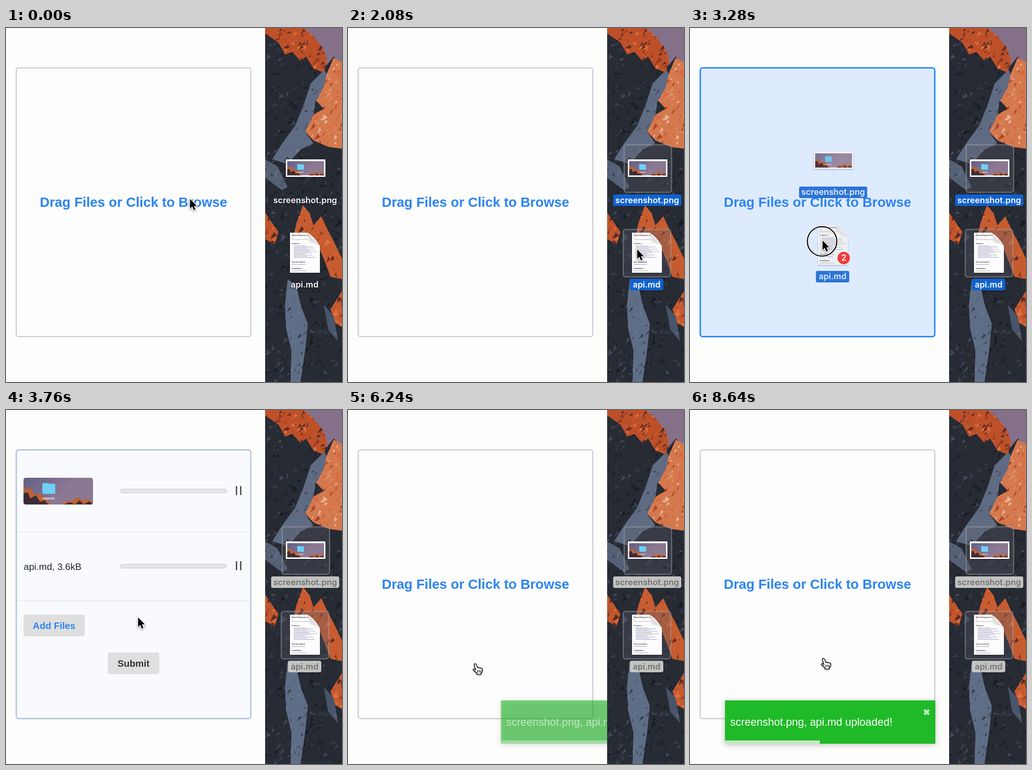
An HTML page with a canvas for the animation above (8720 ms loop, 730 by 768 pixels).

```html
<!DOCTYPE html>
<html lang="en">
<head>
<meta charset="utf-8">
<title>File drop upload</title>
<style>
html, body { margin: 0; width: 100%; height: 100%; overflow: hidden; background: #fdfdfc; }
canvas { display: block; }
</style>
</head>
<body>
<canvas id="stage" width="730" height="768"></canvas>
<script>
const LOOP = 8720, STEP = 80, EDGE = 563;
const SANS = '"Liberation Sans", Arial, sans-serif', UI = 'Inter, "Open Sans", sans-serif';
const BLUE = '#2c84f2';

// Moments at which the state changes, in ms
const BAND = 640, BAND_END = 1440, GRAB = 2200, DRAG = 2415, ENTER = 2700, DROP = 3340;
const SENDING = 3900, SUBMIT = 5700, SENT = 5900, TOAST = 5990;

// Pointer stops: time, x, y
const stops = [
  [80, 400, 371], [600, 584, 233], [680, 584, 233], [1280, 753, 704], [1440, 753, 704],
  [2120, 627, 478], [DRAG, 627, 478], [3255, 288, 461], [3760, 287, 450], [4700, 287, 450],
  [5200, 284, 499], [5600, 277, 550], [6880, 276, 551], [8000, 276, 551], [8640, 290, 539]
];

const canvas = document.getElementById('stage');
let g = canvas.getContext('2d');

const clamp = v => Math.max(0, Math.min(1, v));
const ramp = (t, a, b) => clamp((t - a) / (b - a));
const smooth = u => u * u * (3 - 2 * u);
const mix = (a, b, u) => a + (b - a) * u;
const rgb = (a, b, u) => `rgb(${a.map((v, i) => Math.round(mix(v, b[i], u)))})`;

function box(x, y, w, h, r, fill, stroke, lw = 1) {
  g.beginPath();
  g.roundRect(x, y, w, h, r);
  if (fill) { g.fillStyle = fill; g.fill(); }
  if (stroke) { g.strokeStyle = stroke; g.lineWidth = lw; g.stroke(); }
}

function text(str, x, y, font, color, align = 'left') {
  g.font = font;
  g.fillStyle = color;
  g.textAlign = align;
  g.fillText(str, x, y);
}

function line(d, color, lw) {
  g.strokeStyle = color;
  g.lineWidth = lw;
  g.stroke(new Path2D(d));
}

function shape(d, color) {
  g.fillStyle = color;
  g.fill(new Path2D(d));
}

function shadow(color, blur, y = 0) {
  g.shadowColor = color;
  g.shadowBlur = blur;
  g.shadowOffsetY = y;
}

const noShadow = () => shadow('transparent', 0);

// Wallpaper: flat rock and snow areas with scattered slivers
let seed = 11;
const rnd = () => (seed = (seed * 16807) % 2147483647) / 2147483647;

function rock(d, color, tints, n, [x, y, w, h]) {
  const area = new Path2D(d);
  g.save();
  g.clip(area);
  g.fillStyle = color;
  g.fill(area);
  for (let i = 0; i < n; i++) {
    const px = x + rnd() * w, py = y + rnd() * h, s = 3 + rnd() * 9;
    g.fillStyle = tints[i % tints.length];
    g.beginPath();
    g.moveTo(px, py);
    g.lineTo(px + s * (rnd() - .2), py + s * .6);
    g.lineTo(px - s * rnd(), py + s * (.6 + rnd()));
    g.fill();
  }
  g.restore();
}

function paintWall() {
  const dark = ['#191c25', '#343945', '#20232c', '#414a5b', '#2b2a30'];
  const snow = ['#59667d', '#6c7990', '#4c576c', '#343c4b'];
  const lit = ['#e2703f', '#8e3a22', '#c9582f', '#592c25'];
  const pale = ['#e8b294', '#d9663a', '#a9482b', '#e08a60'];
  rock('M563 0H730V768H563Z', '#272b34', dark, 900, [563, 0, 167, 768]);
  rock('M640 0H730V80L712 62 696 82 680 40Z', '#857089', ['#857089'], 1, [640, 0, 1, 1]);
  rock('M692 90L699 105 688 135 672 160 668 190 650 225 668 250 640 264 612 295 578 285 600 250 628 212 646 168 662 120Z',
    '#5f6b82', snow, 90, [575, 90, 125, 205]);
  rock('M563 285L590 300 612 345 600 352 563 325Z', '#566176', snow, 30, [563, 285, 50, 67]);
  rock('M563 0H648L668 18 690 45 698 72 690 96 668 88 652 62 640 72 622 52 606 58 592 32 563 12Z',
    '#bd5029', lit, 150, [563, 0, 135, 96]);
  rock('M712 64L730 74V262L700 258 668 244 650 225 668 188 690 175 674 158 690 128 697 98Z',
    '#d4784e', pale, 150, [650, 64, 80, 198]);
  rock('M645 384L660 402 668 428 685 408 700 440 712 462 730 500V545L705 540 690 500 672 458 645 450 622 462 632 420Z',
    '#c75c30', lit, 110, [620, 384, 110, 160]);
  rock('M563 400L580 425 592 442 584 470 563 458Z', '#c0552c', lit, 30, [563, 400, 30, 70]);
  rock('M730 570V648L714 640 705 610Z', '#c65b31', lit, 30, [705, 570, 25, 78]);
  rock('M612 545L632 562 640 600 656 642 650 700 640 768H618L620 700 608 650 606 600Z',
    '#5f6e87', snow, 70, [605, 545, 52, 223]);
  rock('M690 600L712 625 722 680 700 655Z', '#49556a', snow, 20, [690, 600, 32, 80]);
}

const wall = document.createElement('canvas');
wall.width = 730;
wall.height = 768;
const screen = g;
g = wall.getContext('2d');
paintWall();
g = screen;

function thumb(x, y, w, r) {
  g.save();
  g.translate(x, y);
  g.scale(w / 151, w / 151);
  g.beginPath();
  g.roundRect(0, 0, 151, 58, r);
  g.clip();
  const sky = g.createLinearGradient(0, 0, 60, 58);
  sky.addColorStop(0, '#625e87');
  sky.addColorStop(1, '#8b7892');
  g.fillStyle = sky;
  g.fillRect(0, 0, 151, 58);
  shape('M0 18L8 26 16 23 24 37 35 34 47 46 62 58H0Z', '#c2622f');
  shape('M0 34L9 31 15 45 27 38 36 52 46 49 54 58H0Z', '#3a2d38');
  shape('M84 58L96 49 105 51 119 42 128 50 138 46 151 53V58Z', '#c2622f');
  shape('M88 58L101 53 112 58 122 49 131 58 143 51 151 57V58Z', '#3a2d38');
  box(41, 11, 14, 8, 2, '#57b9df');
  box(41, 13, 28, 22, 2, '#6fd0f4');
  text('requests', 54.5, 47, `bold 6px ${UI}`, '#fff', 'center');
  g.restore();
}

function sheet() {
  const page = new Path2D('M617 444H655Q670 452 682 473V531H617Z');
  g.save();
  shadow('rgba(0,0,0,.35)', 3, 1);
  g.fillStyle = '#fcfcfc';
  g.fill(page);
  noShadow();
  g.clip(page);
  const head = (s, y) => text(s, 621, y, `bold 4px ${SANS}`, '#333');
  text('React Dropzone Uploader', 621, 451, `bold 4.2px ${SANS}`, '#223');
  for (let i = 0; i < 13; i++) {
    const y = i < 2 ? 455 + i * 3.5 : 467 + i * 2.5;
    g.fillStyle = i % 3 ? '#a5a5b4' : '#8f8fd0';
    g.fillRect(i < 2 ? 621 : 625, y, i ? 22 + (i * 17) % 30 : 3, .9);
  }
  head('Features', 468.5);
  head('Documentation', 509);
  g.fillStyle = '#8f8fd0';
  g.fillRect(621, 512.5, 29, 1);
  head('Installation', 523);
  g.fillStyle = '#a5a5b4';
  g.fillRect(621, 526.5, 32, 1);
  const curl = g.createLinearGradient(657, 468, 671, 455);
  curl.addColorStop(0, '#fff');
  curl.addColorStop(.6, '#d9d9d9');
  curl.addColorStop(1, '#f6f6f6');
  shape('M655 444Q660 455 657 466 670 464 682 473 672 452 655 444Z', curl);
  g.restore();
}

// look: 0 plain, 1 selected in the background, 2 selected
function label(str, x, y, w, look) {
  if (look) box(x, y, w, 25, 4, look === 2 ? '#1062d0' : 'rgba(208,208,206,.92)');
  else shadow('rgba(0,0,0,.8)', 3, 1);
  text(str, x + w / 2, y + 18.5, `600 18.2px ${UI}`, look === 1 ? '#727272' : '#fff', 'center');
  noShadow();
}

function frame(x, y) {
  box(x, y, 103, 103, 5, 'rgba(90,95,105,.32)', 'rgba(170,170,175,.45)', 2.5);
}

function files(shotLook, docLook, ghost) {
  if (shotLook && !ghost) frame(600, 253.5);
  if (docLook && !ghost) frame(598, 437);
  shadow('rgba(0,0,0,.4)', 3, 1);
  box(608, 285, 86, 38, 1, '#fff');
  noShadow();
  thumb(611, 289, 80, 0);
  label('screenshot.png', 576, 361, 148, shotLook);
  sheet();
  label('api.md', 612.5, 544, 72.5, docLook);
}

function desktop(t, p) {
  g.drawImage(wall, EDGE, 0, 167, 768, EDGE, 0, 167, 768);
  const banding = t >= BAND && t < BAND_END;
  let shot = 0, doc = 0;
  if (banding) {
    shot = p.y > 253 && p.x > 599 ? 1 : 0;
    doc = p.y > 436 && p.x > 599 ? 1 : 0;
  } else if (t >= BAND_END) {
    shot = doc = t < DROP ? 2 : 1;
  }
  if (banding) {
    box(584.5, 233.5, Math.max(0, p.x - 584), Math.max(0, p.y - 234.5), 0,
      'rgba(190,195,205,.2)', 'rgba(225,225,225,.75)', 1.2);
  }
  files(shot, doc, false);
}

function row(y, done) {
  box(248.5, y - 4.5, 231, 8.5, 4.3, '#e4e7ea', '#c3c5c8');
  if (done > 0) box(248, y - 5, 232 * done, 9.5, 4.5, '#3f97ee');
  if (done < 1) line(`M500.8 ${y - 11}v19.5M510 ${y - 11}v19.5`, '#3a3a3a', 2.6);
  else line(`M497 ${y - 10.5}l17 17m0 -17l-17 17`, '#42433a', 3);
}

function button(str, x, y, w, fill, color) {
  box(x, y, w, 47, 5, fill);
  text(str, x + w / 2, y + 31, `bold 20.5px ${SANS}`, color, 'center');
}

function page(t) {
  g.fillStyle = '#fdfdfc';
  g.fillRect(0, 0, EDGE, 768);
  const hot = ramp(t, ENTER, ENTER + 500) - ramp(t, DROP, DROP + 500);
  box(22.3, 86.5, 509.5, 583, 5, rgb([253, 253, 253], [222, 235, 255], hot),
    rgb([212, 212, 214], [36, 132, 255], hot), 3);
  if (t < DROP || t >= SENT) {
    text('Drag Files or Click to Browse', 277, 388, `bold 29.3px ${SANS}`, BLUE, 'center');
    return;
  }
  const shot = ramp(t, SENDING, 4700), doc = ramp(t, SENDING, 4500);
  thumb(38, 147, 151, 5);
  row(176, shot);
  line('M24 264.3H531M24 413.8H531', '#e6e7ef', 1.5);
  text('api.md, 3.6kB', 38.5, 347, `20.5px ${SANS}`, '#262626');
  row(339, doc);
  button('Add Files', 38, 444, 133, '#dfdfdf', BLUE);
  if (shot < 1) button('Submit', 221, 526, 112, '#dfdfdf', '#333');
  else button('Submit', 221, 526, 112, '#2a82f0', '#fff');
}

// Slides in from the right, overshooting twice
function slide(u) {
  const keys = [[0, 3000], [.6, -25], [.75, 10], [.9, -5], [1, 0]];
  const i = Math.max(1, keys.findIndex(k => u <= k[0]));
  const [a, from] = keys[i - 1], [b, to] = keys[i];
  const v = 1 - (1 - ramp(u, a, b)) ** 3;
  return mix(from, to, v) * 1.46;
}

function toast(t) {
  if (t < TOAST) return;
  const u = ramp(t, TOAST, TOAST + 700);
  g.save();
  g.beginPath();
  g.rect(0, 0, EDGE, 768);
  g.clip();
  g.globalAlpha = clamp(u / .6);
  g.translate(slide(u), 0);
  shadow('rgba(0,0,0,.25)', 13, 2);
  box(76, 630, 457, 94, 1, '#1fba27');
  noShadow();
  text('screenshot.png, api.md uploaded!', 87.5, 685, `23.4px ${SANS}`, '#fff');
  line('M508.8 650.3l10.5 10.5m0 -10.5l-10.5 10.5', '#bce9bf', 5);
  g.fillStyle = '#c3eac5';
  g.fillRect(76, 717, 457 * (1 - ramp(t, TOAST, TOAST + 4826)), 7);
  g.restore();
}

function ghost(t, p) {
  if (t < DRAG || t >= DROP) return;
  g.save();
  g.globalAlpha = .86;
  g.translate(p.x - 627, p.y - 478);
  files(2, 2, true);
  g.globalAlpha = 1;
  box(659.5, 502.5, 27, 27, 13.5, '#f13b3e');
  text('2', 673, 522.5, `600 18px ${UI}`, '#fff', 'center');
  g.restore();
}

function pointerAt(t) {
  const i = stops.findIndex(s => t < s[0]);
  if (i === 0) return { x: stops[0][1], y: stops[0][2] };
  const b = stops[i < 0 ? stops.length - 1 : i], a = i < 0 ? b : stops[i - 1];
  const u = a === b ? 0 : smooth(ramp(t, a[0], b[0]));
  return { x: mix(a[1], b[1], u), y: mix(a[2], b[2], u) };
}

const arrow = new Path2D('M0 0V20.5L4.7 16.2 8 24 11.6 22.4 8.4 14.9H14.6Z');
const hand = new Path2D('M-2.5 2.5Q-2 -1 1 .3 2.5 1.2 3.5 4.5L5 9Q7.5 7 9 9.5 11.5 7.8 13 10.5 16 9.5 15.8 13 15.8 18 12.5 20V23H3.5V20.5Q0 17.5 -4.5 13.5 -5 10.5 -1.5 11.5L1 13.5Z');

function pointer(t, p) {
  const pressed = (t >= BAND && t < BAND_END) || (t >= GRAB && t < DROP) || (t >= SUBMIT && t < SENT);
  if (pressed) {
    box(p.x - 33, p.y - 30, 64, 64, 32, null, 'rgba(255,255,255,.7)', 4.5);
    box(p.x - 33, p.y - 30, 64, 64, 32, null, '#000', 2.3);
  }
  g.save();
  g.translate(p.x, p.y);
  g.lineJoin = 'round';
  shadow('rgba(0,0,0,.4)', 4, 2);
  if (t > 5200 && p.y > 526) {
    g.fillStyle = '#fff';
    g.fill(hand);
    noShadow();
    g.strokeStyle = '#111';
    g.lineWidth = 1.7;
    g.stroke(hand);
    line('M5.2 13.5v5.5M8.6 13.5v5.5M12 13.5v5.5', '#111', 1.4);
  } else {
    g.strokeStyle = '#fff';
    g.lineWidth = 2.8;
    g.stroke(arrow);
    noShadow();
    g.fillStyle = '#000';
    g.fill(arrow);
  }
  g.restore();
}

function draw() {
  const t = Math.floor((performance.now() % LOOP) / STEP) * STEP;
  const p = pointerAt(t);
  page(t);
  toast(t);
  desktop(t, p);
  ghost(t, p);
  pointer(t, p);
  requestAnimationFrame(draw);
}
draw();
</script>
</body>
</html>
```
